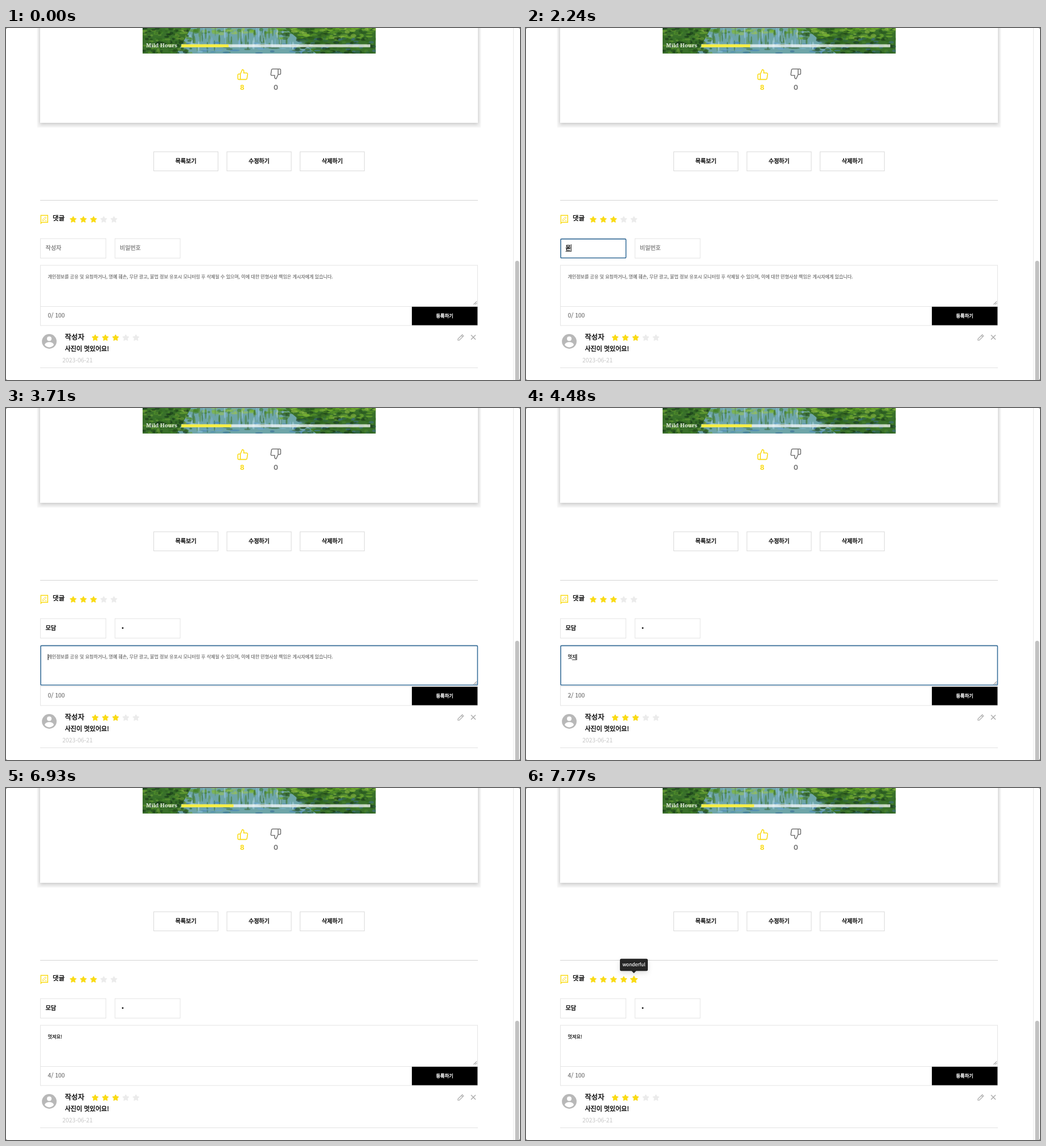
These frames come from a looping animation (903x620 px, 8 s). An HTML page:

```html
<!DOCTYPE html>
<html lang="ko">
<head>
<meta charset="utf-8">
<style>
  html, body { margin: 0; width: 100%; height: 100%; overflow: hidden; background: #777; }
  #page { position: relative; width: 903px; height: 620px; overflow: hidden; background: #fff; border-radius: 3px; }
  #card { position: absolute; left: 60px; top: -60px; width: 769px; height: 226.5px; background: #fff;
    box-shadow: 0 2px 6px rgba(0,0,0,.2), 0 3px 2px 5px rgba(0,0,0,.05); }
  svg { position: absolute; left: 0; top: 0; display: block; }
  text { font-family: "Noto Sans CJK KR", "Noto Sans CJK", "Noto Sans", sans-serif; white-space: pre; }
</style>
</head>
<body>
<div id="page">
  <div id="card"></div>
  <svg id="stage" width="903" height="620" viewBox="0 0 903 620"></svg>
</div>
<script>
const LOOP = 8000;
const YELLOW = '#fadb14', FAINT = '#e4e4e4', HINT = '#6c6c6c';
// A thin outline stands in for the medium weight.
const MEDIUM = { 'stroke-width': .38 }, SOFT = { fill: HINT, 'stroke-width': .18 };
const stage = document.getElementById('stage');

function add(tag, attrs, parent = stage) {
  const node = document.createElementNS('http://www.w3.org/2000/svg', tag);
  for (const key in attrs) node.setAttribute(key, attrs[key]);
  parent.appendChild(node);
  return node;
}
const set = (node, attrs) => { for (const key in attrs) node.setAttribute(key, attrs[key]); };
const show = (node, on) => node.setAttribute('visibility', on ? 'visible' : 'hidden');
const rect = (x, y, width, height, attrs, parent) => add('rect', { x, y, width, height, ...attrs }, parent);
const path = (d, attrs, parent) => add('path', { d, fill: 'none', ...attrs }, parent);
const box = (x, y, w, h, stroke = FAINT) => rect(x, y, w, h, { fill: '#fff', stroke });
const line = (x1, y1, x2, y2, stroke) => path(`M${x1} ${y1}L${x2} ${y2}`, { stroke });

function label(x, y, size, value, { fill = '#000', ...attrs } = {}, parent) {
  const node = add('text', { x, y, 'font-size': size, fill, stroke: fill, 'stroke-width': 0, ...attrs }, parent);
  node.textContent = value;
  return node;
}

function star(cx, cy, fill) {
  let points = '';
  for (let i = 0; i < 10; i++) {
    const a = i * Math.PI / 5, r = i % 2 ? 3 : 5.8;
    points += `${(r * Math.sin(a)).toFixed(2)},${(-r * Math.cos(a)).toFixed(2)} `;
  }
  return add('polygon', { points, fill, stroke: fill, 'stroke-width': 1, 'stroke-linejoin': 'round',
    transform: `translate(${cx} ${cy})` });
}
const starRow = (x, y) => [0, 1, 2, 3, 4].map(i => star(x + i * 17.9, y, i < 3 ? YELLOW : '#ebebeb'));

// Garden pond seen through foliage, scattered from a seed.
function drawPhoto() {
  let seed = 11;
  const rnd = (a, b) => {
    seed = (seed * 16807) % 2147483647;
    return a + (b - a) * seed / 2147483647;
  };
  const clip = add('clipPath', { id: 'photo' }, add('defs', {}));
  rect(240, 0, 409.5, 45, {}, clip);
  const g = add('g', { 'clip-path': 'url(#photo)' });
  const scatter = (n, x0, x1, y0, y1, rx, ry, colors) => {
    for (let i = 0; i < n; i++) add('ellipse', {
      cx: rnd(x0, x1).toFixed(1), cy: rnd(y0, y1).toFixed(1),
      rx: rnd(rx * .4, rx).toFixed(1), ry: rnd(ry * .4, ry).toFixed(1),
      fill: colors[Math.floor(rnd(0, colors.length))], opacity: .6
    }, g);
  };
  rect(240, 0, 410, 45, { fill: '#39702a' }, g);
  path('M325 0H490L545 45H300Z', { fill: '#6ea5a8' }, g);
  scatter(70, 310, 520, 0, 10, 6, 3, ['#5a9a2c', '#82b93a', '#3f7d28', '#97c257']);
  scatter(80, 320, 510, 4, 34, 2, 11, ['#4a8038', '#a9cfe0', '#5f9448', '#7fb3d2', '#356a30']);
  scatter(60, 300, 560, 26, 46, 9, 2, ['#4583b8', '#69a5d0', '#346a96', '#416f48', '#8cbfdf']);
  scatter(150, 240, 325, 0, 45, 5, 3, ['#1c4418', '#2f6420', '#4a8a2a', '#6da036', '#16351a']);
  scatter(130, 480, 650, 0, 20, 7, 3, ['#5c9c24', '#79b42e', '#356c22', '#244f1c', '#8fbe44']);
  scatter(150, 510, 650, 18, 45, 6, 3, ['#1c4418', '#2f6420', '#336a48', '#18381c', '#4a8630', '#3d6f86']);
}

drawPhoto();
label(246, 34.3, 9.7, 'Mild Hours', {
  fill: '#fff', opacity: .88, 'font-weight': 700, style: 'font-family:"Noto Serif",serif'
});
rect(308, 28.7, 332, 5.2, { fill: '#fff', opacity: .72 });
const progress = rect(308, 28.7, 83, 5.2, { fill: '#f6ee45' });

// Votes
const thumb = 'M14 9V5a3 3 0 0 0-3-3l-4 9v11h11.3a2 2 0 0 0 2-1.7l1.4-9a2 2 0 0 0-2-2.3zM7 22H4a2 2 0 0 1-2-2v-7a2 2 0 0 1 2-2h3';
path(thumb, { stroke: YELLOW, 'stroke-width': 1.8, transform: 'translate(405.6 71.5) scale(.87)' });
path(thumb, { stroke: '#777', 'stroke-width': 1.8, transform: 'translate(484.2 91.3) rotate(180) scale(.87)' });
const vote = { 'font-weight': 700, 'text-anchor': 'middle', style: 'font-family:Inter,sans-serif' };
label(415, 109, 12, '8', { ...vote, fill: YELLOW });
label(474, 109, 12, '0', { ...vote, fill: '#777' });

['목록보기', '수정하기', '삭제하기'].forEach((name, i) => {
  box(259.5 + i * 128.6, 218, 113, 33.7, '#d9d9d9');
  label(316 + i * 128.6, 237.6, 10, name, { ...MEDIUM, 'text-anchor': 'middle' });
});
line(60, 303.5, 829, 303.5, '#d4d4d4');

// Comment form
path('M61.3 344V330h12v12.2H63.2z', { stroke: YELLOW, 'stroke-width': 1.4 });
path('M64.2 339.3v-1.7l4.8-4.8 1.6 1.6-4.8 4.9zM68.6 339.3h2.6', { stroke: YELLOW, 'stroke-width': 1 });
label(82, 339.3, 11.3, '댓글', MEDIUM);
const rating = starRow(118, 337.6);

box(60.5, 371, 115, 34.3);
box(191.5, 371, 114.5, 34.3);
box(60.5, 418, 768, 72.5);
box(60.5, 490.5, 768, 33.5);
rect(713, 491, 115.3, 32.5, { fill: '#000' });
label(770.7, 509.7, 8.3, '등록하기', { ...MEDIUM, fill: '#fff', 'text-anchor': 'middle' });
const counter = label(73.5, 510, 10.3, '', SOFT);

const hints = [
  label(69.5, 391, 10, '작성자', SOFT),
  label(200, 391, 10, '비밀번호', SOFT),
  label(73.5, 441.3, 8.02, '개인정보를 공유 및 요청하거나, 명예 훼손, 무단 광고, 불법 정보 유포시 모니터링 후 삭제될 수 있으며, 이에 대한 민형사상 책임은 게시자에게 있습니다.', SOFT)
];
const author = label(69.5, 391, 10, '', MEDIUM);
const comment = label(73.5, 441.3, 8.15, '', { 'stroke-width': .2 });
const bullet = add('circle', { cx: 205, cy: 387.6, r: 1.4 });
const ring = { fill: 'none', stroke: '#3b719c', 'stroke-width': 1.6, rx: 1.8 };
const rings = [
  rect(61, 371.6, 114.6, 33.4, ring),
  rect(191.6, 371.6, 114.4, 33.4, ring),
  rect(61, 418.6, 767.4, 69.4, ring)
];
path('M821.5 487l5.5-5.5M824.5 487l2.5-2.5', { stroke: '#555', 'stroke-width': .9 });
const caret = rect(0, 0, 1, 13, { fill: '#000' });
const underline = rect(0, 0, 0, .8, { fill: '#000' });

// Posted comment
add('circle', { cx: 76, cy: 552, r: 12.9, fill: '#b8b8b8' });
add('circle', { cx: 76, cy: 547.3, r: 4, fill: '#fff' });
path('M68.2 558.3c0-6.6 15.6-6.6 15.6 0a9.4 9.4 0 0 1-15.6 0z', { fill: '#fff' });
label(103.5, 548.8, 12.3, '작성자', MEDIUM);
starRow(156.7, 545.8);
label(103.5, 569.3, 11, '사진이 멋있어요!', MEDIUM);
label(99, 588.6, 10.4, '2023-06-21', { fill: '#c6c6c6' });
path('M794 550v-2.2l7.6-7.6 2.2 2.2-7.6 7.6zM800 541.8l2.2 2.2', { stroke: '#aaa', 'stroke-width': 1.2 });
path('M817 540.8l8 8M825 540.8l-8 8', { stroke: '#aaa', 'stroke-width': 1.4 });
line(60, 598.5, 829, 598.5, '#e2e2e2');

// Scrollbar
line(891.5, 0, 891.5, 620, '#e9e9e9');
rect(894.5, 410, 7, 230, { rx: 3.5, fill: '#c1c1c1' });

const tip = add('g', { style: 'filter:drop-shadow(0 3px 4px rgba(0,0,0,.13))' });
rect(165, 300.7, 49, 21.6, { rx: 2.5, fill: '#262626' }, tip);
path('M185.3 322h8.4l-4.2 4.2z', { fill: '#262626' }, tip);
label(189.5, 314.2, 8.4, 'wonderful', { fill: '#fff', 'stroke-width': .15, 'text-anchor': 'middle' }, tip);

// Latest entry of [time, value] that has begun.
const at = (t, track) => track.reduce((value, [start, next]) => t >= start ? next : value, track[0][1]);
const ease = (t, start, length) => {
  const p = Math.min(1, Math.max(0, (t - start) / length));
  return 1 - (1 - p) ** 3;
};

const FOCUS = [[0, -1], [910, 0], [2870, 1], [3500, 2], [6720, -1]];
const BLINK = [[0, false], [980, true], [1610, false], [2030, true], [5670, false], [6230, true]];
const AUTHOR = [[0, ''], [2030, 'ㅁ'], [2170, '모'], [2240, '몯'], [2310, '모다'], [2450, '모담']];
const COMMENT = [[0, ''], [4060, 'ㅁ'], [4130, '머'], [4270, '멋'], [4410, '멋ㅈ'], [4480, '멋지'],
  [4620, '멋져'], [4760, '멋져ㅇ'], [4830, '멋져요'], [5110, '멋져요!']];

const endOf = (node, x) => x + (node.textContent ? node.getComputedTextLength() : 0);

function render(t) {
  const focus = at(t, FOCUS), name = at(t, AUTHOR), note = at(t, COMMENT), hasKey = t >= 3150;
  progress.setAttribute('width', 83 + t * .00125);

  author.textContent = name;
  comment.textContent = note;
  counter.textContent = note.length + '/ 100';
  [name, hasKey, note].forEach((value, i) => show(hints[i], !value));
  show(bullet, hasKey);
  rings.forEach((node, i) => show(node, i === focus));

  const ends = [endOf(author, 69.5), hasKey ? 209 : 200.5, endOf(comment, 73.5)];
  show(caret, focus >= 0 && at(t, BLINK));
  if (focus >= 0) set(caret, { x: ends[focus], y: focus === 2 ? 433.5 : 381, height: focus === 2 ? 10.5 : 13 });

  const composing = focus === 0 ? name : focus === 2 && t < 5110 ? note : '';
  show(underline, composing);
  if (composing) {
    const width = focus === 0 ? 9.2 : 7.5;
    set(underline, { x: ends[focus] - width, y: focus === 0 ? 393 : 443, width });
  }

  const tint = t >= 7000 ? YELLOW : '#ebebeb';
  rating.slice(3).forEach(node => set(node, { fill: tint, stroke: tint }));
  rating[4].setAttribute('transform', `translate(189.6 337.6) scale(${1 + .1 * ease(t, 7000, 300)})`);
  const pop = ease(t, 7140, 140);
  set(tip, { opacity: pop, transform: `translate(189.5 326) scale(${.8 + .2 * pop}) translate(-189.5 -326)` });
}

const begin = performance.now();
function tick() {
  render((performance.now() - begin) % LOOP);
  requestAnimationFrame(tick);
}
tick();
</script>
</body>
</html>
```
